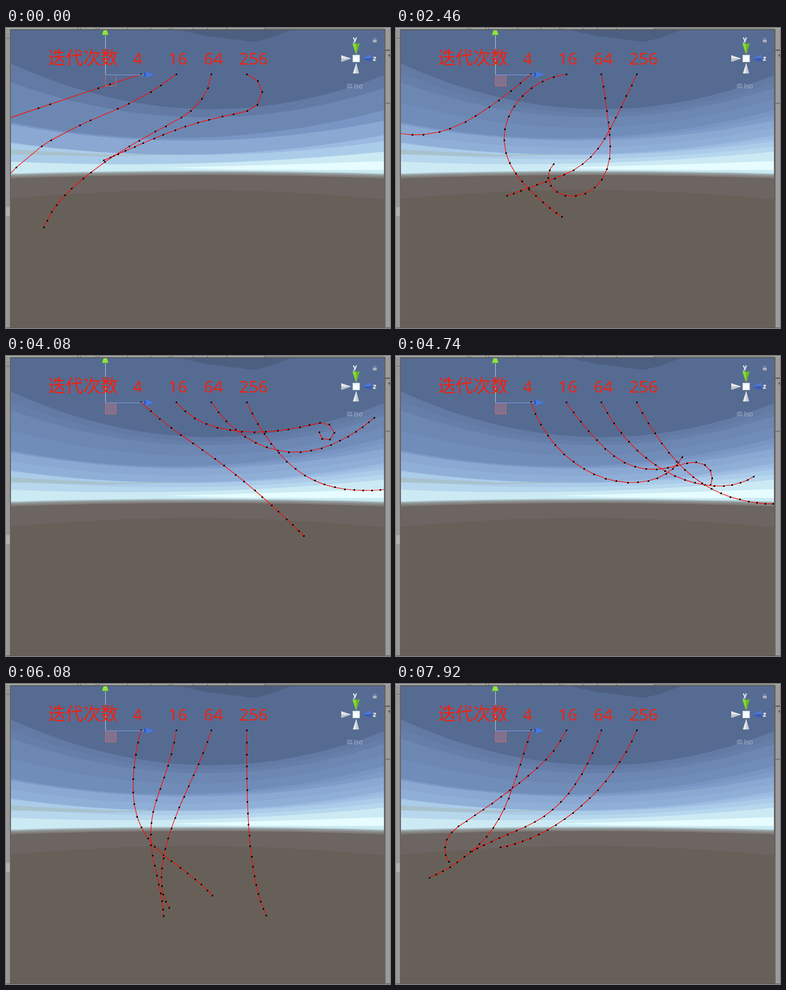
Write an HTML page with a canvas that moves like this. It is 693x541 px and loops after 8 s.

```html
<!DOCTYPE html>
<html lang="zh">
<head>
<meta charset="utf-8">
<title>Rope iterations</title>
<style>
html, body { margin: 0; width: 100%; height: 100%; overflow: hidden; background: #676059; }
canvas { display: block; }
</style>
</head>
<body>
<canvas id="stage" width="693" height="541"></canvas>
<script>
const W = 693, H = 541, LOOP = 8000, HOLD = 460, STEP = 73.92;
const VIEW = { left: 9, top: 4, right: 682, bottom: 540 };
const SEGMENTS = 18;
const ctx = document.getElementById('stage').getContext('2d');

// A rope bends smoothly through four headings (degrees, clockwise from right).
const KNOTS = [0, .25, .7, 1];
// `pull` stretches the ropes; each rope with more iterations gives less.
const POSES = [
  { at: 390, pull: 120, bend: [[162, 161, 140, 130], [144, 157, 115, 100], [105, 152, 139, 114], [31, 168, 157, 156]] },
  { at: 1280, pull: 5, bend: [[337, 332, 420, 450], [395, 235, 350, 200], [230, 250, 300, 220], [235, 240, 60, 60]] },
  { at: 2460, pull: 10, bend: [[139, 147, 195, 205], [168, 126, 47, 36], [81, 84, 180, 305], [115, 117, 160, 160]] },
  { at: 4080, pull: 7, bend: [[42, 35, 42, 45], [45, 10, -12, 245], [55, 28, -24, -40], [64, 50, 6, -8]] },
  { at: 5340, pull: 0, bend: [[95, 60, -30, -112], [70, 84, -16, -16], [73, 70, 50, -5], [61, 56, 36, 10]] },
  { at: 6740, pull: 6, bend: [[107, 107, 108, 178], [119, 125, 156, 170], [134, 140, 133, 122], [115, 119, 121, 125]] },
  { at: 7920, pull: 0, bend: [[107, 109, 141, 155], [119, 140, 146, 64], [110, 123, 157, 153], [115, 129, 152, 168]] }
];

// Monotone cubic curve through (xs, ys).
function curve(xs, ys) {
  const n = xs.length;
  const d = i => (ys[i + 1] - ys[i]) / (xs[i + 1] - xs[i]);
  const slope = i => {
    if (i === 0) return d(0);
    if (i === n - 1) return d(n - 2);
    const a = d(i - 1), b = d(i);
    return a * b <= 0 ? 0 : 2 * a * b / (a + b);
  };
  return x => {
    const t = Math.min(Math.max(x, xs[0]), xs[n - 1]);
    let i = 0;
    while (i < n - 2 && t > xs[i + 1]) i++;
    const h = xs[i + 1] - xs[i], u = (t - xs[i]) / h, v = 1 - u;
    return ys[i] * v * v * (1 + 2 * u) + ys[i + 1] * u * u * (1 + 2 * v)
      + h * u * v * (slope(i) * v - slope(i + 1) * u);
  };
}

const times = POSES.map(p => p.at);
const pullAt = curve(times, POSES.map(p => p.pull));

function makeRope(index) {
  const headings = KNOTS.map((_, k) => curve(times, POSES.map(p => p.bend[index][k])));
  return t => {
    const heading = curve(KNOTS, headings.map(f => f(t)));
    const slack = pullAt(t) / 3 ** index;
    let x = 243 + 63.7 * index, y = 83;
    const points = [[x, y]];
    for (let i = 0; i < SEGMENTS; i++) {
      const u = i / (SEGMENTS - 1);
      const a = heading(u) * Math.PI / 180;
      // Only every other segment yields to the pull.
      const extra = i % 2 ? 0 : slack * Math.sin(Math.PI * (i + 2) / 20);
      const length = 21.8 - 9 * u * u + extra;
      x += length * Math.cos(a);
      y += length * Math.sin(a);
      points.push([x, y]);
    }
    return points;
  };
}
const ropes = [0, 1, 2, 3].map(makeRope);

function rect(x, y, w, h, color) {
  ctx.fillStyle = color;
  ctx.fillRect(x, y, w, h);
}
function poly(points, color) {
  ctx.beginPath();
  for (let i = 0; i < points.length; i += 2) ctx.lineTo(points[i], points[i + 1]);
  ctx.closePath();
  ctx.fillStyle = color;
  ctx.fill();
}
function line(x1, y1, x2, y2, color) {
  ctx.beginPath();
  ctx.moveTo(x1, y1);
  ctx.lineTo(x2, y2);
  ctx.strokeStyle = color;
  ctx.lineWidth = 1;
  ctx.stroke();
}
function label(text, x, y, font, color) {
  ctx.font = font;
  ctx.fillStyle = color;
  ctx.fillText(text, x, y);
}

// Fills everything below a parabola given by its left, middle and right height.
function band([left, mid, right], color, alpha = 1) {
  ctx.globalAlpha = alpha;
  ctx.beginPath();
  ctx.moveTo(9, H);
  ctx.lineTo(9, left);
  ctx.quadraticCurveTo(346, 2 * mid - (left + right) / 2, 683, right);
  ctx.lineTo(683, H);
  ctx.fillStyle = color;
  ctx.fill();
  ctx.globalAlpha = 1;
}

const SKY = [
  { y: [64, 146, 85], color: '#627aa4' },
  { y: [98, 161, 108], color: '#6c87b2' },
  { y: [170, 198, 148], color: '#7995c4' },
  { y: [174, 203, 167], color: '#8aa8d1' },
  { y: [206, 228, 193], color: '#9bb9e1' },
  { y: [208, 229, 204], color: '#abcce9' },
  { y: [241, 244, 223], color: '#cbeaf4' }
];

function drawSky(smooth) {
  rect(8, 3, 675, 538, '#566b92');
  poly([309, 3, 360, 14, 446, 25, 477, 18, 515, 3], '#4d5f80');
  SKY.forEach(({ y, color }, i) => {
    if (smooth && i) band(y.map((v, k) => (v + SKY[i - 1].y[k]) / 2), color, .35);
    if (i === SKY.length - 1) {
      poly([9, 219, 180, 228, 330, 228, 180, 232, 9, 228], 'rgba(169,190,195,.75)');
    }
    band(y, color);
  });
  poly([290, 252, 400, 249, 540, 245, 683, 240, 683, 256, 540, 256, 400, 255], '#e6fcfe');
  for (let i = 0; i < 5; i++) {
    const y = 258 + i * 1.6, fade = i / 4;
    const tone = [185, 215, 223].map((c, k) => c + ([128, 124, 122][k] - c) * Math.sqrt(fade));
    band([y + 4, y - 1, y + 4], `rgb(${tone})`);
  }
  band([271, 265, 271], '#6c6562');
  band([308, 292, 309], '#676059');
}

function drawFrame() {
  rect(0, 0, 8, H, '#989898');
  rect(0, 18, 7, 1, '#6b6b6b');
  rect(0, 323, 7, 16, '#b0b0b0');
  rect(7, 2, 2, H, '#666463');
  rect(682, 2, 3, H, '#666463');
  rect(685, 0, 8, H, '#9b9b9b');
  rect(685, 39, 8, 2, '#555');
  rect(685, 135, 8, 1, '#555');
  poly([690, 48, 693, 48, 693, 53], '#444');
  rect(0, 0, W, 2, '#a8aaa8');
  rect(8, 2, 677, 2, '#5b5c5d');
  for (const x of [129, 134, 162, 167, 219, 261, 295, 299, 337, 363, 398, 466]) {
    rect(x, 0, 1, 3, '#555');
  }
  rect(467, 0, 216, 2, '#8d8f8e');
  rect(0, 540, W, 1, '#5d5955');
}

function drawHandles(filled) {
  if (filled) rect(180, 85, 19, 20, 'rgba(180,120,140,.45)');
  ctx.strokeStyle = '#c96c69';
  ctx.lineWidth = 1;
  ctx.strokeRect(179.5, 84.5, 19, 20);
  line(179.5, 12, 179.5, 84, '#b4c6dc');
  line(180, 84.5, 250, 84.5, '#7b98df');
  poly([176, 4, 182, 4, 185, 13, 173, 13], '#8fe43b');
  rect(173, 12, 12, 1, '#62a829');
  poly([250, 78, 268, 84, 250, 90], '#4678e0');
  poly([250, 78, 253, 84, 250, 90], '#2750ac');
}

// A cone seen from the side: lit as a whole, shaded on one half.
function cone(x1, y1, x2, y2, tipX, tipY, light, dark) {
  poly([x1, y1, x2, y2, tipX, tipY], light);
  poly([(x1 + x2) / 2, (y1 + y2) / 2, x2, y2, tipX, tipY], dark);
}

function drawCompass() {
  cone(625, 28, 638, 28, 632, 48, '#86dc34', '#66b822');
  cone(659, 48, 659, 61, 642, 55, '#4a78d8', '#345cb4');
  cone(605, 49, 605, 61, 623, 55, '#e2e6e8', '#bfc6ca');
  cone(626, 82, 637, 82, 632, 63, '#e8ecee', '#c6ccd0');
  rect(625, 48, 14, 14, '#8e9aa8');
  rect(626, 49, 12, 12, '#f4ffff');
  const bold = 'bold 13px "Open Sans", sans-serif';
  label('y', 626, 24, bold, '#f3f5f8');
  label('z', 662, 59, bold, '#f3f5f8');
  rect(662, 21, 7, 5, '#a9b0bd');
  ctx.beginPath();
  ctx.arc(665.5, 20.5, 2.3, Math.PI, 0);
  ctx.strokeStyle = '#a9b0bd';
  ctx.lineWidth = 1;
  ctx.stroke();
  for (const y of [101, 104, 107]) rect(615, y, 10, 1, '#a9b5ca');
  label('Iso', 628, 109, '12px "Open Sans", sans-serif', '#a9b5ca');
}

function drawRope(points) {
  ctx.beginPath();
  for (const [x, y] of points) ctx.lineTo(x + .5, y + .5);
  ctx.strokeStyle = '#ff0a00';
  ctx.lineWidth = 1.2;
  ctx.stroke();
  for (const [x, y] of points) {
    const px = Math.round(x), py = Math.round(y);
    rect(px - 1, py, 3, 2, '#050505');
    rect(px, py - 1, 2, 3, '#050505');
  }
}

function drawTitle() {
  const red = '#f2210c';
  const han = '300 31.6px "Noto Sans CJK SC Light", "Noto Sans CJK SC DemiLight", "Noto Sans CJK SC", sans-serif';
  label('迭代次数', 76, 65, han, red);
  ['4', '16', '64', '256'].forEach((text, i) => {
    label(text, 229 + 64 * i, 66, '30px "Open Sans", "Noto Sans", sans-serif', red);
  });
}

function stepped(t) {
  if (t < HOLD) return 0;
  return HOLD + STEP * Math.floor((t - HOLD + 8) / STEP);
}

function draw(now) {
  const t = stepped(now % LOOP);
  drawSky(t > 0);
  drawFrame();
  ctx.save();
  ctx.beginPath();
  ctx.rect(VIEW.left, VIEW.top, VIEW.right - VIEW.left, VIEW.bottom - VIEW.top);
  ctx.clip();
  for (const rope of ropes) drawRope(rope(t));
  ctx.restore();
  drawHandles(t > 0);
  drawCompass();
  drawTitle();
}

const start = performance.now();
function tick() {
  draw(performance.now() - start);
  requestAnimationFrame(tick);
}
tick();
</script>
</body>
</html>
```
